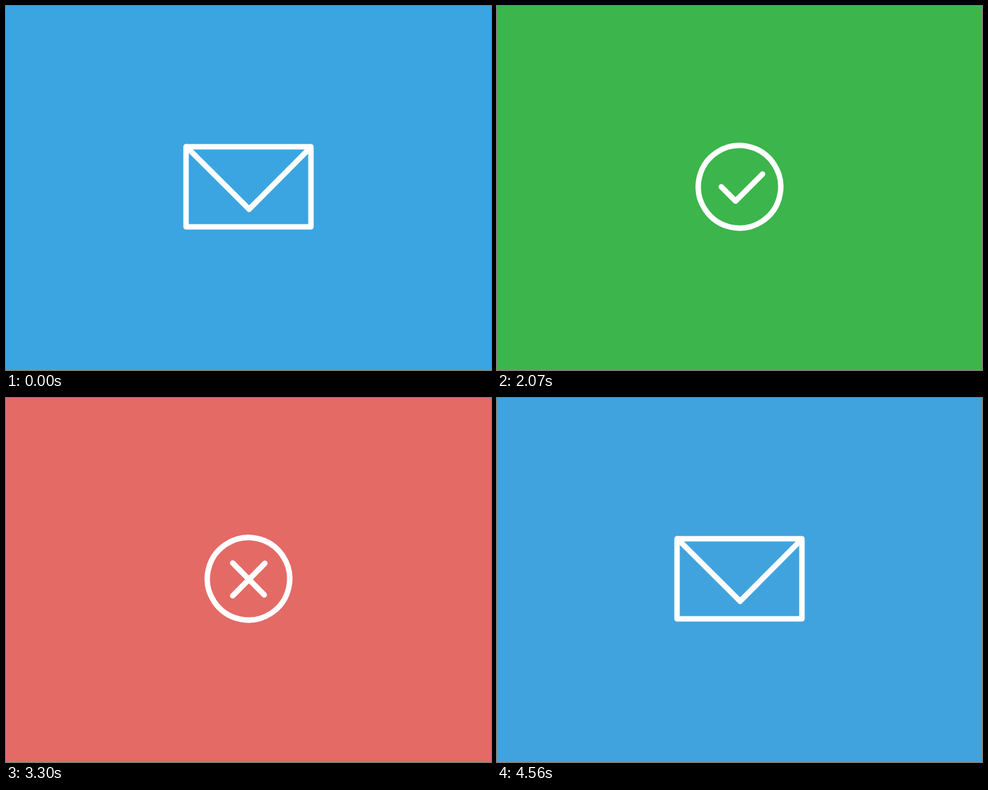
An HTML page for the animation above (4680 ms loop, 800 by 600 pixels).

```html
<!DOCTYPE html>
<html lang="en">
<head>
<meta charset="utf-8">
<title>Envelope morph</title>
<style>
  html, body { margin: 0; width: 100%; height: 100%; overflow: hidden; }
  svg { display: block; width: 800px; height: 600px; }
  #icon { fill: none; stroke: #fff; stroke-width: 9; stroke-linecap: round; stroke-linejoin: round; }
</style>
</head>
<body>
<svg viewBox="0 0 800 600">
  <rect id="back" width="800" height="600"/>
  <g id="icon">
    <rect id="frame"/>
    <path id="left"/>
    <path id="right"/>
  </g>
</svg>
<script>
const LOOP = 4680, STEP = 30;

// Each stroke is x1, y1, x2, y2.
const mail = { color: [59, 165, 225], left: [297.5, 232, 401, 335], right: [401, 335, 502.5, 233] };
const check = { color: [60, 181, 75], left: [370, 298, 393.5, 321.5], right: [393.5, 321.5, 438, 277] };
const cross = { color: [228, 106, 102], left: [374, 272, 426, 324.5], right: [374, 326, 427, 272.5] };

// tint: exponent of the colour blend; rest: tint left over at the end
const moves = [
  { start: 690, end: 1020, icon: check, open: false, tint: 1.75 },
  { start: 2040, end: 2310, icon: check, open: true, tint: 2.2 },
  { start: 3060, end: 3300, icon: cross, open: false, tint: 1.75 },
  { start: 4260, end: 4560, icon: cross, open: true, tint: 2.2, rest: 0.035 }
];

const $ = id => document.getElementById(id);
const mix = (a, b, k) => a + (b - a) * k;
const mixAll = (a, b, k) => a.map((v, i) => mix(v, b[i], k));
const easeOut = (u, n) => 1 - (1 - u) ** n;

function setAttrs(id, attrs) {
  for (const name in attrs) $(id).setAttribute(name, attrs[name]);
}

function line(id, [x1, y1, x2, y2]) {
  setAttrs(id, { d: `M${x1} ${y1}L${x2} ${y2}` });
}

// u runs from 0 (envelope) to 1 (round icon).
function draw(u, icon, tint) {
  const w = mix(206, 136, u), h = mix(132, 136, u);
  const r = Math.min(68 * easeOut(u, 4.1), h / 2);
  setAttrs("frame", {
    x: 400 - w / 2, y: 298 - h / 2, width: w, height: h, rx: r, ry: r,
    transform: `rotate(${57 * u} 400 298)`
  });

  const near = easeOut(u, 2), far = easeOut(u, icon === check ? 1.65 : 2);
  const [x1, y1, x2, y2] = mail.right, [a1, b1, a2, b2] = icon.right;
  line("left", mixAll(mail.left, icon.left, near));
  line("right", [mix(x1, a1, near), mix(y1, b1, near), mix(x2, a2, far), mix(y2, b2, far)]);

  const rgb = mixAll(mail.color, icon.color, tint).map(Math.round);
  setAttrs("back", { fill: `rgb(${rgb})` });
}

function render(now) {
  const t = Math.floor(now % LOOP / STEP) * STEP;
  const move = moves.findLast(m => t >= m.start);
  if (!move) {
    draw(0, check, 0);
  } else {
    const x = Math.min(1, (t - move.start) / (move.end - move.start));
    const u = move.open ? 1 - x ** 2.66 : x ** 3.7;
    draw(u, move.icon, Math.max(u ** move.tint, move.rest || 0));
  }
  requestAnimationFrame(render);
}

render(performance.now());
</script>
</body>
</html>
```
